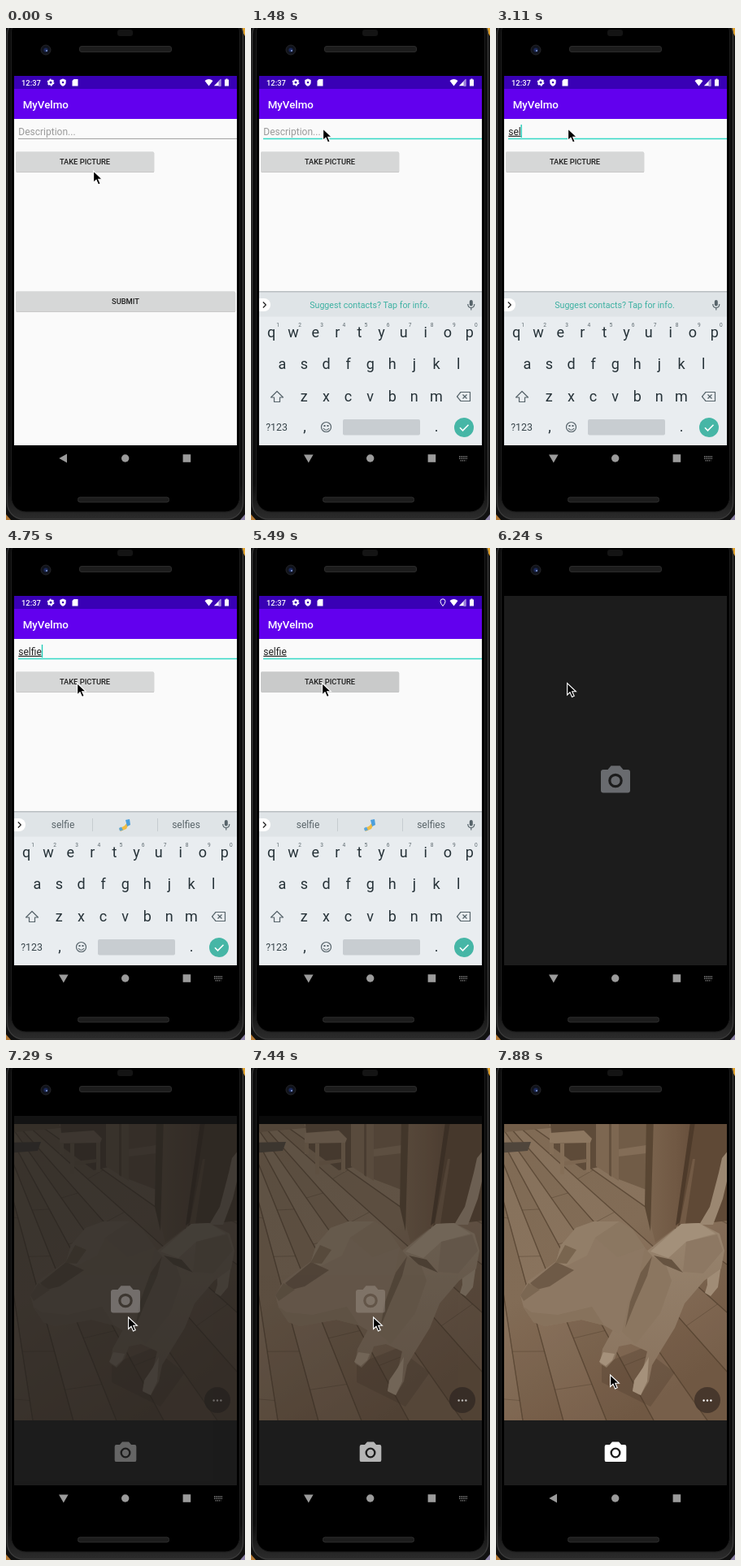
An HTML page for the animation above (8000 ms loop, 294 by 606 pixels).

```html
<!DOCTYPE html>
<html lang="en">
<head>
<meta charset="utf-8">
<title>Phone demo</title>
<style>
  html, body { margin: 0; width: 100%; height: 100%; overflow: hidden; background: #000; }
  svg { display: block; width: 294px; height: 606px; font-family: Roboto, sans-serif; }
  .mid { text-anchor: middle; }
  .btn { font-size: 9.33px; font-weight: 500; fill: #1e1e1e; text-anchor: middle; }
  .key { font-size: 18px; fill: #263238; text-anchor: middle; }
  .num { font-size: 6.6px; fill: #5c686e; text-anchor: middle; }
  .word { font-size: 12px; fill: #5b666b; text-anchor: middle; }
  .line { fill: none; stroke: #56636a; stroke-width: 1.2; stroke-linejoin: round; }
  #scene { filter: blur(.7px); }
</style>
</head>
<body>
<svg viewBox="0 0 294 606">
  <defs>
    <clipPath id="screen"><rect x="10" y="59" width="274" height="455"/></clipPath>
    <clipPath id="view"><rect x="10" y="69" width="274" height="365"/></clipPath>
    <clipPath id="reveal"><rect id="revealBox" x="10" y="59" width="274" height="455"/></clipPath>
    <linearGradient id="floor" x2=".5" y2="1">
      <stop offset="0" stop-color="#836e58"/><stop offset=".5" stop-color="#87705a"/><stop offset="1" stop-color="#735a45"/>
    </linearGradient>
    <linearGradient id="fur" x2="0" y2="1">
      <stop offset="0" stop-color="#98846e"/><stop offset="1" stop-color="#88725d"/>
    </linearGradient>
    <linearGradient id="wall" x2="1" y2="0">
      <stop offset="0" stop-color="#7b644e"/><stop offset=".6" stop-color="#705843"/><stop offset="1" stop-color="#654d3a"/>
    </linearGradient>
    <linearGradient id="shell" x2="0" y2="1">
      <stop offset=".93" stop-color="#0c0c0c"/><stop offset="1" stop-color="#2c2c2c"/>
    </linearGradient>
    <g id="camera">
      <path d="M-15-13.500h5.500l4-4.700H5.500l4 4.700H15q3 0 3 3v22.500q0 3-3 3h-30q-3 0-3-3v-22.500q0-3 3-3z"/>
      <circle r="7.200" fill="none" stroke="#1c1c1c" stroke-width="3.200"/>
    </g>
  </defs>

  <!-- phone body -->
  <rect width="294" height="606" fill="#111"/>
  <path d="M288 0h6v10z" fill="#e0a12c"/>
  <path d="M0 606v-7l6 7z" fill="#b57a35"/><path d="M294 606v-7l-6 7z" fill="#8d83a8"/>
  <rect x="1.500" y="-12" width="290" height="617" rx="20" fill="url(#shell)" stroke="#3a3a3a" stroke-width="1.400"/>
  <rect x="6.500" y="-12" width="281" height="608" rx="18" fill="#000" stroke="#1d1d1d"/>
  <rect x="137" y="2" width="19" height="8" rx="3" fill="#141414"/>
  <circle cx="49" cy="27" r="6" fill="#11141d" stroke="#242427"/>
  <circle cx="49" cy="27" r="2.600" fill="#1c2a5c"/><circle cx="50" cy="28" r="1" fill="#8ba4df"/>
  <rect x="90.500" y="22.500" width="113" height="7" rx="2.500" fill="#1c1c1c" stroke="#2b2b2b"/>
  <rect x="88.500" y="578" width="112" height="6" rx="2.500" fill="#1c1c1c" stroke="#2e2e2e"/>

  <g clip-path="url(#screen)">
    <g id="app">
      <rect x="10" y="59" width="274" height="475" fill="#fafafa"/>
      <rect x="10" y="59" width="274" height="16" fill="#3900b5"/>
      <rect x="10" y="75" width="274" height="37" fill="#6200ee"/>
      <text x="20.700" y="99" font-size="13.33" font-weight="500" fill="#fff">MyVelmo</text>
      <text id="hint" x="15.300" y="131.700" font-size="12" fill="#9a9a9a">Description...</text>
      <text id="typed" x="15.300" y="131.700" font-size="12" fill="#222" text-decoration="underline"></text>
      <rect id="rule" x="15" width="269"/>
      <rect id="caret" y="119" width="1.400" height="16" fill="#24cdb9"/>
      <g fill="#c4c4c4"><rect x="12.300" y="153" width="170" height="25" rx="1.500"/><rect x="12.300" y="325" width="270" height="25" rx="1.500"/></g>
      <rect id="take" x="12" y="152.300" width="170" height="25" rx="1.500"/>
      <circle id="ripple" cx="88" cy="166" opacity=".1"/>
      <text class="btn" x="97" y="168.300">TAKE PICTURE</text>
      <rect x="12" y="324.300" width="270" height="25" rx="1.500" fill="#d6d7d7"/>
      <text class="btn" x="147" y="340.300">SUBMIT</text>
    </g>

    <g id="shot">
      <rect x="10" y="59" width="274" height="455" fill="#000"/>
      <g clip-path="url(#view)"><g id="scene">
        <rect x="0" y="60" width="294" height="384" fill="url(#floor)"/>
        <g id="planks" stroke="#4f3d2c"></g>
        <path d="M0 60h66v14L10 79H0z" fill="#725d48"/>
        <path d="M0 92l43-1-4 11-39 3z" fill="#4f453b"/>
        <!-- table and doorway -->
        <path d="M66 60h60v62l-18 4-38-28z" fill="#5e4b39"/>
        <path d="M66 80l42-3 10 10-2 5-50 1z" fill="#8d7760"/>
        <path d="M66 92h5v14h-5zM79 93h5v38h-5zM111 92h5v36h-5z" fill="#846e57"/>
        <path d="M84 115l28-3v4l-28 4z" fill="#7d6751"/>
        <path d="M123 60h28v79l-28-18z" fill="#7d6751"/>
        <path d="M139 60h3v74l-3-2z" fill="#5b4836" opacity=".7"/>
        <path d="M151 60h34v90l-34-13z" fill="#715c47"/>
        <path d="M151 100l34-5v10l-34 4z" fill="#836d57"/>
        <path d="M185 60h62l-20 132-31 23-10-40z" fill="url(#wall)"/>
        <path d="M185 60h9l-4 141-7-30z" fill="#594633"/>
        <path d="M240 60h54v127l-70 8z" fill="#5f4936"/>
        <path d="M240 60h6l-20 130-5 4z" fill="#4d3a2a"/>
        <path d="M226 192l16-80 3 0-12 80z" fill="#725a45"/>
        <path d="M130 365l50-20 40 30-30 42-60-30z" fill="#4a3828" opacity=".28"/>
        <!-- dog -->
        <path d="M250 193l13-22 11-42 4-18 8-10v30l-7 30-12 32z" fill="#9b8771"/>
        <path d="M259 240l19-5-5 35-9 11-7-4 3-10z" fill="#a08c76"/>
        <path d="M185 226l43-34 22-1 25 13 6 21-4 22-21 15-24 28-12 30-16 26-12 20-4 20-10 17-10-5 3-15 10-13 5-21-20-9-15 3-5 15-10 11-8-5 3-18 12-22z" fill="url(#fur)"/>
        <path d="M190 226l38-34 22-1 20 13-36 10-22 20z" fill="#a3907a"/>
        <path d="M234 214l38-9 7 20-24 28-25-2z" fill="#8d7863"/>
        <path d="M170 385l10-15 8-14-2 30-8 17-10-5zM132 350l14 2-3 8-8 7-8-5z" fill="#a5917b"/>
        <path d="M30 280l10-18 34-24 6-20 18-21 22-8h32l16 10 15 22 9 11-14 18-13 35-7 33-8 9-17-10-28-7-45 8-14-5-12-18z" fill="#8d7863"/>
        <path d="M80 218l18-21 22-8h32l-30 20-10 22-28 14-10-7z" fill="#927e68"/>
        <path d="M122 209l30-20 16 10 15 22-33 12z" fill="#8b7761"/>
        <path d="M42 265l32-26 22 10-30 20-16 4z" fill="#6e5a47"/>
        <path d="M73 240l12-22 14 6-12 17z" fill="#79654f"/>
        <path d="M30 280l10-15 14 8-20 14z" fill="#7b6752"/>
        <path d="M34 294l10 7 32 3 42-10 15 23-28-7-45 8-14-5z" fill="#87725c"/>
        <path d="M183 222l9 10 16 8 8 22-14 40-30 38-17-15 8-36 14-36z" fill="#8b7660"/>
        <path d="M192 232l-14 20-13 36-6 32 12-30 15-34z" fill="#705c48"/>
        <path d="M194 231l22 5 14 16-24-10z" fill="#665340"/>
      </g></g>
      <rect x="10" y="434" width="274" height="80" fill="#1c1c1c"/>
      <circle cx="260" cy="409" r="16" fill="#3d3027" opacity=".8"/>
    </g>

    <g id="panel" clip-path="url(#reveal)">
      <rect x="10" y="59" width="274" height="475" fill="#1c1c1c"/>
      <use id="bigCam" href="#camera" fill="#696b6f"/>
    </g>
    <g id="controls" fill="#fff">
      <use href="#camera" transform="translate(147 474) scale(.74)"/>
      <circle cx="255.600" cy="409.500" r="1.200"/><circle cx="260" cy="409.500" r="1.200"/><circle cx="264.400" cy="409.500" r="1.200"/>
    </g>

    <g id="status" fill="#fff">
      <text x="19" y="70.700" font-size="9.4" font-weight="500">12:37</text>
      <circle cx="55" cy="67" r="2.500" fill="none" stroke="#fff" stroke-width="2"/>
      <circle cx="55" cy="67" r="3.800" fill="none" stroke="#fff" stroke-width="1.200" stroke-dasharray="2 1.980"/>
      <path d="M70 62.500l3.700 1.500v3q0 3.300-3.700 4.700-3.700-1.400-3.700-4.700v-3z"/>
      <circle cx="70" cy="67" r="1.300" fill="#3900b5"/>
      <path d="M83.500 63h5v8.500h-7v-6.500z"/>
      <path d="M244.500 65q5-4 10 0l-5 6.500zM264.300 62.800v8.500h-8.500z"/>
      <path d="M261.500 66v6h3v-9z" fill="#9c82dc"/>
      <path d="M270.500 62.500h2v1h1.500v8h-5v-8h1.500z"/>
      <path id="pin" d="M236 71.500q-3-3.700-3-5.700a3 3 0 0 1 6 0q0 2-3 5.700z" fill="none" stroke="#fff"/>
    </g>

    <g id="board">
      <rect x="10" y="325" width="274" height="189" fill="#e9edf0"/>
      <rect x="10" y="325" width="274" height="30.500" fill="#dfe4e7"/>
      <rect x="10" y="324" width="274" height="1.500" fill="#b9bec1"/>
      <rect x="2" y="333" width="22" height="16" rx="8" fill="#fff"/>
      <path class="line" d="M14.800 337.500l3.500 3.500-3.500 3.500" style="stroke:#222"/>
      <text id="tip" class="mid" x="146" y="345" font-size="10.67" fill="#3db1a2">Suggest contacts? Tap for info.</text>
      <g id="words">
        <text class="word" x="70" y="345">selfie</text><text class="word" x="221.500" y="345">selfies</text>
        <path d="M106.500 333v16M186.500 333v16" stroke="#c6ccd0"/>
        <path d="M139 346l7-4 3-4 2 2-3 6-7 3z" fill="#f0bd45"/>
        <path d="M147 335l5-1 1 7-4 2z" fill="#4c9fdc"/><path d="M139 345l3-1.500 2 4-4 1z" fill="#5aa7dc"/>
      </g>
      <rect x="268.800" y="335" width="4" height="7.500" rx="2" fill="#56636a"/>
      <path class="line" d="M266.800 340q0 4.500 4 4.500t4-4.500M270.800 344.500v3"/>
      <g id="keys"></g>
      <path class="line" d="M32 447.500l7.500 7.500h-4v5.500h-7V455h-4z"/>
      <path class="line" d="M258 448.500h11.500v11H258l-4.500-5.500zM260.500 451.500l5 5m0-5l-5 5"/>
      <text x="31.500" y="496" font-size="12.4" fill="#37444a" class="mid">?123</text>
      <text class="key" x="66" y="497">,</text><text class="key" x="228" y="497">.</text>
      <circle class="line" cx="92.500" cy="491.500" r="6"/>
      <path class="line" d="M89 493q3.500 4.500 7 0"/>
      <path d="M89.500 489h2v2h-2zM93.500 489h2v2h-2z" fill="#56636a"/>
      <rect x="113" y="482" width="95" height="19.500" rx="2" fill="#c8cdd1"/>
      <circle cx="262" cy="492" r="12" fill="#46b6a6"/>
      <path d="M257 492.300l3.500 3.500 7-7" fill="none" stroke="#fff" stroke-width="1.600"/>
    </g>
  </g>

  <!-- navigation bar -->
  <g fill="#9b9b9b">
    <path id="back"/>
    <circle cx="146.700" cy="530" r="4.700"/>
    <rect x="217.600" y="525.200" width="9.600" height="9.600"/>
    <path id="kbIcon" d="M256 528h10M256 530.300h10M257.500 532.800h7" stroke="#8a8a8a" stroke-width="1.300" stroke-dasharray="1.300 .9"/>
  </g>
  <path id="mouse" d="M-.4-1v14.500l3.400-3.200 2.500 5.700 2.700-1.200-2.500-5.500h4.700z" fill="#000" stroke="#fff" stroke-width="1.100"/>
</svg>

<script>
const $ = id => document.getElementById(id);
const LOOP = 8000, TICK = 148.6;

// Cursor stops: tick, x, y
const path = [[0, 108, 177], [4, 89, 125], [27, 89, 125], [32, 88, 167.5], [42, 88, 167.5],
  [45, 185, 249], [47, 151, 308], [50, 151, 308], [53, 141, 379]];
const fade = [.7, .37, .18, .07, 0];

function add(parent, tag, attrs, text = "") {
  const el = document.createElementNS("http://www.w3.org/2000/svg", tag);
  for (const name in attrs) el.setAttribute(name, attrs[name]);
  el.textContent = text;
  parent.append(el);
}
function set(id, attrs) {
  for (const name in attrs) $(id).setAttribute(name, attrs[name]);
}
const show = (id, on) => $(id).style.display = on ? "" : "none";
const move = (id, x, y) => set(id, { transform: `translate(${x} ${y})` });

[["qwertyuiop", 25, 381], ["asdfghjkl", 38.3, 419.5], ["zxcvbnm", 65.3, 459.5]].forEach(([row, x, y], r) => {
  [...row].forEach((c, i) => {
    const cx = x + i * 27.1;
    add($("keys"), "text", { class: "key", x: cx, y }, c);
    if (!r) add($("keys"), "text", { class: "num", x: cx + 8, y: 367.5 }, (i + 1) % 10);
  });
});

// Floorboards fan out from one vanishing point, with short joints between them
for (let i = 0; i < 9; i++) {
  const at = (a, d) => `${-30 + d * Math.cos(a)} ${20 + d * Math.sin(a)}`;
  const step = .115, a = .5 + i * step;
  add($("planks"), "path", {
    d: `M${at(a, 60)}L${at(a, 560)}L${at(a + step, 560)}L${at(a + step, 60)}`,
    fill: i % 2 ? "#5a4430" : "#a08a72", "fill-opacity": .1, "stroke-opacity": .45, "stroke-width": 1.3,
  });
  for (let j = 0; j < 2; j++) {
    const d = 130 + j * 170 + (i * 53) % 110;
    add($("planks"), "path", { d: `M${at(a, d)}L${at(a + step, d - 8)}`, "stroke-opacity": .4 });
  }
}

function cursorAt(k) {
  const n = Math.max(1, path.findIndex(p => p[0] >= k));
  const [k0, x0, y0] = path[n - 1], [k1, x1, y1] = path[n];
  const f = (k - k0) / (k1 - k0);
  return [x0 + (x1 - x0) * f, y0 + (y1 - y0) * f];
}

function draw(k) {
  const focus = k >= 5;
  const count = k < 17 ? 0 : k < 20 ? 1 : k < 21 ? 2 : k < 24 ? 3 : k < 25 ? 5 : 6;
  const caretX = 15 + [0, 6.2, 12.6, 15.5, 19.7, 22.6, 28.8][count];
  const caretOn = focus && !(k >= 9 && k < 14) && !(k >= 28 && k < 31) && !(k >= 35 && k < 38);

  move("mouse", ...cursorAt(k));
  show("hint", !count);
  $("typed").textContent = "selfie".slice(0, count);
  set("rule", { y: focus ? 135.7 : 135.9, height: focus ? 1.5 : .8, fill: focus ? "#35d8c5" : "#858585" });
  set("caret", { x: caretX });
  show("caret", caretOn);
  set("take", { fill: k >= 34 ? "#c9caca" : "#d6d7d7" });
  set("ripple", { r: k >= 34 && k < 37 ? 2 + (k - 34) * 4 : 0 });

  show("board", k >= 9 && k < 42);
  move("board", 0, k === 9 ? 95 : k === 41 ? 110 : 0);
  show("tip", k < 25);
  show("words", k >= 25);
  show("status", k < 42);
  show("pin", k >= 37);

  // Camera screen reveals upward while the form drifts away
  const slide = Math.min(3, Math.max(0, k - 38));
  move("app", 0, [0, -5, -8, -9.5][slide]);
  const top = k < 42 ? [514, 250, 86, 62][slide] : 59;
  set("revealBox", { y: top, height: 514 - top });
  move("bigCam", 147, k < 42 ? [299, 299, 291, 288][slide] : 286.5);
  const cover = k < 49 ? 1 : fade[k - 49];
  show("panel", k >= 39);
  set("panel", { opacity: cover });
  show("shot", k >= 49);
  show("controls", k >= 49);
  set("controls", { opacity: Math.min(1, (1 - cover) * 1.07) });

  const down = k >= 8 && k < 52;
  set("back", { d: down ? "M65 525.500h11.600l-5.800 10z" : "M65.300 530l9.700-5.500v11z" });
  show("kbIcon", down);
}

function frame() {
  const t = performance.now() % LOOP;
  draw(Math.min(53, Math.floor((t + 12) / TICK)));
  requestAnimationFrame(frame);
}
frame();
</script>
</body>
</html>
```
